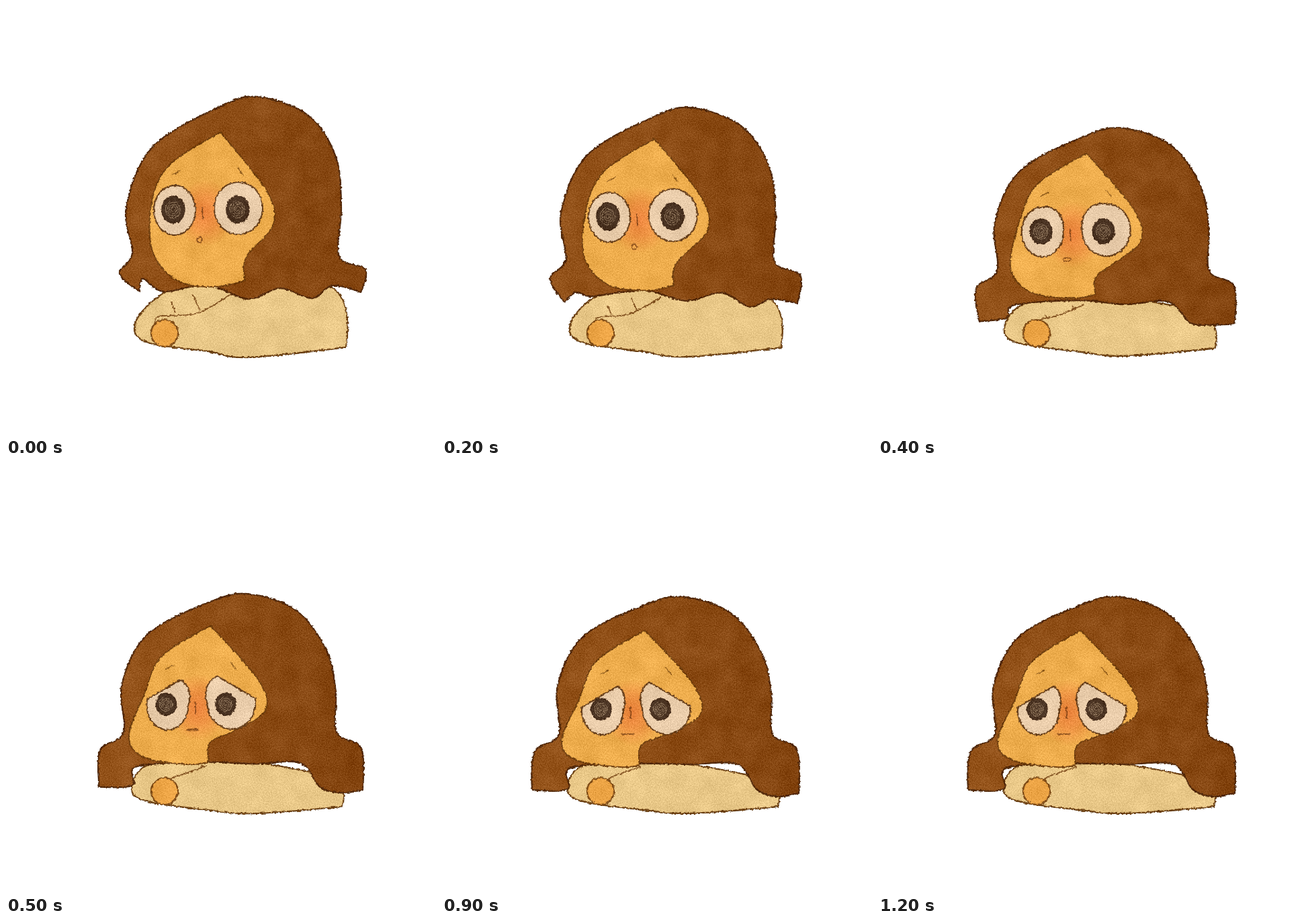
Write an HTML page that moves like this. It is 640 by 640 pixels and loops after 1300 ms.

```html
<!DOCTYPE html>
<html lang="en">
<head>
<meta charset="utf-8">
<title>Tired girl</title>
<style>
  html, body { margin: 0; width: 100%; height: 100%; overflow: hidden; background: #fff; }
  svg { display: block; width: 100vw; height: 100vh; }
</style>
</head>
<body>
<svg viewBox="0 0 640 640" fill="none" stroke-linecap="round" stroke-linejoin="round">
  <defs>
    <linearGradient id="brown" gradientUnits="userSpaceOnUse" x1="160" y1="0" x2="520" y2="0">
      <stop offset="0" stop-color="#94531a"/>
      <stop offset="1" stop-color="#844510"/>
    </linearGradient>
    <radialGradient id="blush">
      <stop offset="0" stop-color="#ec7a3a" stop-opacity=".8"/>
      <stop offset=".5" stop-color="#ec7a3a" stop-opacity=".5"/>
      <stop offset="1" stop-color="#ec7a3a" stop-opacity="0"/>
    </radialGradient>
    <!-- Crayon edges, fine grain and soft paper blotches -->
    <filter id="paper" filterUnits="userSpaceOnUse" x="0" y="0" width="640" height="640" color-interpolation-filters="sRGB">
      <feTurbulence type="fractalNoise" baseFrequency=".25" numOctaves="2"/>
      <feColorMatrix values="1 0 0 0 0  0 1 0 0 0  0 0 1 0 0  0 0 0 0 1" result="wobble"/>
      <feDisplacementMap in="SourceGraphic" in2="wobble" scale="4" xChannelSelector="R" yChannelSelector="G" result="art"/>
      <feTurbulence type="fractalNoise" baseFrequency=".6" numOctaves="2"/>
      <feColorMatrix values="1 0 0 0 0  1 0 0 0 0  1 0 0 0 0  0 0 0 0 1" result="grain"/>
      <feTurbulence type="fractalNoise" baseFrequency=".03" numOctaves="3"/>
      <feColorMatrix values="1 0 0 0 0  1 0 0 0 0  1 0 0 0 0  0 0 0 0 1" result="blotch"/>
      <feComposite in="art" in2="grain" operator="arithmetic" k2="1" k3=".26" k4="-.13"/>
      <feComposite in2="blotch" operator="arithmetic" k2="1" k3=".1" k4="-.05"/>
      <feComposite in2="art" operator="in"/>
    </filter>
  </defs>
  <g id="girl" filter="url(#paper)"></g>
</svg>
<script>
// Key points sitting up and slumped; "*" marks a sharp corner.
const hair = [
  '318,150 375,135 450,163 491,225 499,300 496,373 535,392 528,426* 486,416 455,435 408,420 360,436 300,415 235,425 204,406 199,425* 169,398 188,368 179,300 218,210',
  '304,209 360,198 430,222 475,280 490,340 492,402 528,425 531,490* 497,495 468,484 440,447 370,447 300,446 192,452 187,484 134,485* 138,428 174,402 172,330 210,257'
];
const face = [
  '319,188* 388,275 398,325 362,367 354,388 356,409* 310,418 255,409 218,365 217,290 245,235',
  '302,248* 372,325 385,372 335,402 297,418 294,448* 265,451 200,441 178,412 204,350 230,293'
];
const body = [
  '235,427 193,470 208,500 300,514 360,523 506,508* 486,420 310,400',
  '215,447 187,478 205,501 300,515 370,520 500,510* 480,470 310,440'
];
const sleeve = ['336,428 285,457 228,462 222,474', '295,451 262,462 250,467 248,469'];
const folds = [['278,430 288,452', '293,451 294,451'], ['246,440 252,456', '250,467 251,467']];

const girl = document.getElementById('girl');
const noises = document.querySelectorAll('feTurbulence');

const lerp = (a, b, t) => a + (b - a) * t;
const clamp = t => Math.max(0, Math.min(1, t));
const ease = t => (t = clamp(t), t * t * (3 - 2 * t));

function mix([a, b], t) {
  const ends = b.match(/[\d.]+/g);
  return a.replace(/[\d.]+/g, v => lerp(+v, +ends.shift(), t));
}

function curve(text, open) {
  const pts = text.split(' ').map(p => ({ xy: p.split(',').map(parseFloat), sharp: p.endsWith('*') }));
  const n = pts.length;
  const at = i => pts[open ? Math.max(0, Math.min(n - 1, i)) : (i + n) % n];
  const handle = (i, sign) => at(i).xy.map((v, k) =>
    at(i).sharp ? v : v + sign * (at(i + 1).xy[k] - at(i - 1).xy[k]) / 6);
  let d = 'M' + pts[0].xy;
  for (let i = 0; i < n - (open ? 1 : 0); i++) d += `C${handle(i, 1)} ${handle(i + 1, -1)} ${at(i + 1).xy}`;
  return open ? d : d + 'Z';
}

const path = (d, fill, stroke, width) =>
  `<path d="${d}" fill="${fill}" stroke="${stroke}" stroke-width="${width}"/>`;
const line = (text, stroke = '#80501f', width = 1.8) => path(curve(text, true), 'none', stroke, width);
const oval = (cx, cy, rx, ry, fill, stroke = 'none', width = 2) =>
  `<ellipse cx="${cx}" cy="${cy}" rx="${rx}" ry="${ry}" fill="${fill}" stroke="${stroke}" stroke-width="${width}"/>`;

// An oval cut by a lid that slopes down and outwards; side is -1 left, 1 right.
function eye(cx, cy, rx, ry, side, droop) {
  const lid = lerp(2, .6, droop);
  const rim = Array.from({ length: 60 }, (_, i) => {
    const a = i * Math.PI / 30;
    const inner = Math.cos(a) < 0 && Math.sin(a) < 0;
    const r = inner ? 1 + .22 * droop * Math.sin(2 * a) : 1;
    const x = rx * r * Math.cos(a);
    return [cx + side * x, cy + Math.max(ry * r * Math.sin(a), .58 * x - lid * ry)];
  });
  return path(`M${rim.join('L')}Z`, '#e9ccaa', '#68401c', 2.2);
}

function pupil(cx, cy, rx, ry) {
  const swirl = Array.from({ length: 30 }, (_, i) => {
    const r = .1 + i / 48;
    return [cx + rx * r * Math.cos(i * .8), cy + ry * r * Math.sin(i * .8)].join();
  }).join(' ');
  return oval(cx, cy, rx, ry, '#4a3322', '#432a18', 1.5) + line(swirl, '#a98e70', .9);
}

// Everything here is placed around the bridge of the nose.
function features(sag, droop) {
  const rx = lerp(17, 15, droop), ry = lerp(20, 16, droop);
  return `<g transform="translate(${lerp(293, 281, sag)} ${lerp(308, 370, sag)})">` +
    oval(3, 0, 44, 50, 'url(#blush)') +
    eye(-42, -4, 31, 37, -1, droop) + eye(53, -7, 36, 39, 1, droop) +
    pupil(-44, -5, rx, ry) + pupil(lerp(52, 44, droop), -5, rx, ry) +
    line('-45,-57 -33,-63', '#94601f', 1.6) + line('52,-67 60,-57', '#94601f', 1.6) +
    line('-1,-8 0,8', '#8a4a1c') +
    oval(-5, lerp(40, 32, droop), lerp(4, 9, droop), lerp(4, .3, droop), 'none', '#8a4f1c', 1.6) +
    '</g>';
}

function draw(step) {
  const t = clamp(step / 6);
  const sink = ease(t);
  const droop = ease((t - .5) * 2.5);
  const sag = clamp((t + droop) / 2); // the face lags behind the hair
  noises.forEach((noise, i) => noise.setAttribute('seed', 1 + step % 3 + i * 5));
  girl.innerHTML =
    path(curve(mix(body, sink)), '#e9c888', '#6f4315', 2.4) +
    line(mix(sleeve, sink)) + folds.map(fold => line(mix(fold, sink))).join('') +
    oval(236, 487, 20, 20, '#eda546', '#7f4b16', 2.2) +
    path(curve(mix(hair, sink)), 'url(#brown)', '#542a0a', 2.4) +
    path(curve(mix(face, sag)), '#eead4d', '#71400f', 2) +
    features(sag, droop);
}

let shown = -1;
function tick() {
  const step = Math.floor(performance.now() % 1300 / 100);
  if (step !== shown) draw(shown = step);
  requestAnimationFrame(tick);
}
tick();
</script>
</body>
</html>
```
